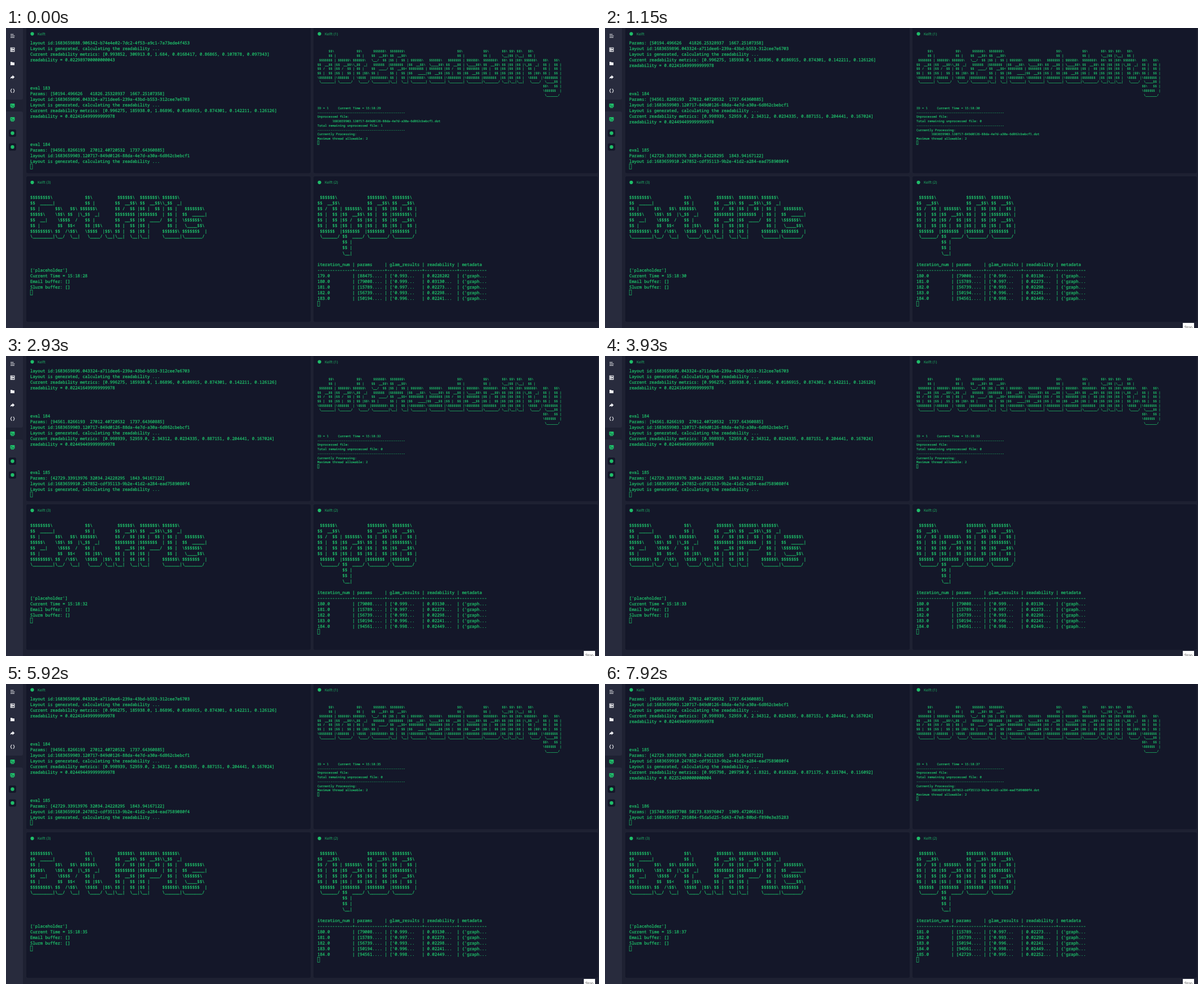
Animation, 1053 px wide and 532 px high, one loop 8 s. Source, as an HTML page:

```html
<!DOCTYPE html>
<html lang="en">
<head>
<meta charset="utf-8">
<title>Four terminals</title>
<style>
  html, body { margin: 0; height: 100%; overflow: hidden; background: #1e2132; }
  svg { display: block; width: 100vw; height: 100vh; }
  text { text-rendering: geometricPrecision; fill: #1fbd69; white-space: pre; }
  .term { font-family: "Noto Sans Mono", "DejaVu Sans Mono", monospace; }
  .term text { stroke: #1fbd69; stroke-width: .035em; }
  .title { font: 6.6px "Open Sans", "Noto Sans", sans-serif; }
  .cursor { fill: none; stroke: #1fbd69; stroke-width: .7; }
  .green { fill: #1fbd69; }
  .dark { fill: #141729; }
  .white { fill: #f4f5f8; }
  .line { fill: none; stroke: #f4f5f8; stroke-width: 1.1; }
</style>
</head>
<body>
<svg viewBox="0 0 1053 532">
  <defs>
    <g id="terminal">
      <rect x="-4" y="-4" width="8" height="6.4" rx="1" class="green"/>
      <path d="M-2.4-2.4-1.1-1.1-2.4.2M0 .5h2.2" fill="none" stroke="#141729" stroke-width=".7"/>
      <rect x="-2.5" y="2.9" width="5" height="1" class="green"/>
    </g>
    <g id="host">
      <rect x="-6.5" y="-6.5" width="13" height="13" rx="3" class="dark"/>
      <circle r="3.2" class="green"/>
    </g>
  </defs>
  <rect width="30" height="532" fill="#282b3d"/>
  <path d="M0 127h27q3 0 3-3v27q0-3-3-3H0z" fill="#1e2132"/>
  <path class="line" d="M8 11.3h5.5M8 14h7.5M8 16.7h7"/>
  <path class="line" d="M8.3 35h6.6v2.6H8.3zM8.3 39h6.6v2.6H8.3zM9.5 36.3h2M9.5 40.3h2"/>
  <path class="white" d="M8 60h2.8l1 1H15v5H8z"/>
  <path class="white" d="M11.5 83.5 15.3 87l-3.8 3.4v-2Q9 88.3 7.7 90q.4-4.1 3.8-4.5z"/>
  <path class="line" d="M10.6 108q-1.5 0-1.5 1.4 0 1.6-1.2 1.8 1.2.2 1.2 1.8 0 1.4 1.5 1.4M12.6 108q1.5 0 1.5 1.4 0 1.6 1.2 1.8-1.2.2-1.2 1.8 0 1.4-1.5 1.4"/>
  <use href="#terminal" x="11.5" y="138"/>
  <use href="#terminal" x="11.5" y="162"/>
  <use href="#host" x="11.5" y="186.5"/>
  <use href="#host" x="11.5" y="211"/>
  <g id="panels"></g>
  <g id="screens"></g>
  <g id="stop">
    <rect x="1026" y="523" width="20" height="10" fill="#fff"/>
    <text x="1029" y="533.4" class="title" style="fill:#333">Stop</text>
  </g>
</svg>
<script>
const LOOP = 8000;
const raw = String.raw;
const byId = id => document.getElementById(id);

// Banner letters, rows separated by "~".
const GLYPHS = {
  E: raw`$$$$$$$$\~$$  _____|~$$ |~$$$$$\~$$  __|~$$ |~$$$$$$$$\~\________|`,
  x: raw`~~$$\   $$\~\$$\ $$  |~ \$$$$  /~ $$  $$<~$$  /\$$\~\__/  \__|`,
  t: raw`  $$\~  $$ |~$$$$$$\~\_$$  _|~  $$ |~  $$ |$$\~  \$$$$  |~   \____/`,
  '.': raw`~~~~~~$$\~\__|`,
  A: raw` $$$$$$\~$$  __$$\~$$ /  $$ |~$$$$$$$$ |~$$  __$$ |~$$ |  $$ |~$$ |  $$ |~\__|  \__|`,
  P: raw`$$$$$$$\~$$  __$$\~$$ |  $$ |~$$$$$$$  |~$$  ____/~$$ |~$$ |~\__|`,
  I: raw`$$$$$$\~\_$$  _|~  $$ |~  $$ |~  $$ |~  $$ |~$$$$$$\~\______|`,
  s: raw`~~ $$$$$$$\~$$  _____|~\$$$$$$\~ \____$$\~$$$$$$$  |~\_______/`,
  O: raw` $$$$$$\~$$  __$$\~$$ /  $$ |~$$ |  $$ |~$$ |  $$ |~$$ |  $$ |~ $$$$$$  |~ \______/`,
  p: raw`~~ $$$$$$\~$$  __$$\~$$ /  $$ |~$$ |  $$ |~$$$$$$$  |~$$  ____/~$$ |~$$ |~\__|`,
  D: raw`$$$$$$$\~$$  __$$\~$$ |  $$ |~$$ |  $$ |~$$ |  $$ |~$$ |  $$ |~$$$$$$$  |~\_______/`,
  B: raw`$$$$$$$\~$$  __$$\~$$ |  $$ |~$$$$$$$\ |~$$  __$$\~$$ |  $$ |~$$$$$$$  |~\_______/`,
  d: raw`      $$\~      $$ |~ $$$$$$$ |~$$  __$$ |~$$ /  $$ |~$$ |  $$ |~\$$$$$$$ |~ \_______|`,
  o: raw`~~ $$$$$$\~$$  __$$\~$$ /  $$ |~$$ |  $$ |~\$$$$$$  |~ \______/`,
  2: raw` $$$$$$\~$$  __$$\~\__/  $$ |~ $$$$$$  |~$$  ____/~$$ |~$$$$$$$$\~\________|`,
  R: raw`$$$$$$$\~$$  __$$\~$$ |  $$ |~$$$$$$$  |~$$  __$$<~$$ |  $$ |~$$ |  $$ |~\__|  \__|`,
  e: raw`~~ $$$$$$\~$$  __$$\~$$$$$$$$ |~$$   ____|~\$$$$$$$\~ \_______|`,
  a: raw`~~ $$$$$$\~ \____$$\~ $$$$$$$ |~$$  __$$ |~\$$$$$$$ |~ \_______|`,
  b: raw`$$\~$$ |~$$$$$$$\~$$  __$$\~$$ |  $$ |~$$ |  $$ |~$$$$$$$  |~\_______/`,
  i: raw`$$\~\__|~$$\~$$ |~$$ |~$$ |~$$ |~\__|`,
  l: raw`$$\~$$ |~$$ |~$$ |~$$ |~$$ |~$$ |~\__|`,
  y: raw`~~$$\   $$\~$$ |  $$ |~$$ |  $$ |~$$ |  $$ |~\$$$$$$$ |~ \____$$ |~$$\   $$ |~\$$$$$$  |~ \______/`
};

// Joins letters, letting neighbours share a column when nothing collides.
function banner(word) {
  let rows = Array(11).fill('');
  for (const letter of word) {
    const lines = GLYPHS[letter].split('~');
    const width = Math.max(...lines.map(l => l.length));
    const glyph = rows.map((_, i) => (lines[i] || '').padEnd(width));
    const kern = rows[0] && rows.every((r, i) => r.endsWith(' ') || glyph[i][0] === ' ');
    rows = rows.map((r, i) => !kern ? r + glyph[i]
      : r.slice(0, -1) + (r.endsWith(' ') ? glyph[i][0] : r.at(-1)) + glyph[i].slice(1));
  }
  return rows;
}

const BANNERS = { reader: banner('dot2Readability'), apis: banner('Ext.APIs'), db: banner('OpDB') };

const RUNS = [
  [182, '', '1683659888.906342-b74e4e02-7dc2-4f53-a9c1-7a73ede4f453',
    '0.993852, 306913.0, 1.684, 0.0168417, 0.86865, 0.107878, 0.097343', '0.022989700000000043'],
  [183, '50194.496626   41826.25328937  1667.25107358', '1683659896.043324-a711dee6-239a-43bd-b553-312cee7e6703',
    '0.996275, 185938.0, 1.86896, 0.0186915, 0.874301, 0.142211, 0.126126', '0.022416499999999978'],
  [184, '94561.8266193  27012.40720532  1737.64360885', '1683659903.120717-849d0126-88da-4e7d-a30a-6d862cbebcf1',
    '0.998939, 52959.0, 2.34312, 0.0234335, 0.887151, 0.204441, 0.167024', '0.024494499999999978'],
  [185, '42729.33913976 32034.24228295  1843.94167122', '1683659910.247852-cdf35113-9b2e-41d2-a284-ead7589080f4',
    '0.995798, 209750.0, 1.8321, 0.0183228, 0.871175, 0.131704, 0.116092', '0.02252480000000004'],
  [186, '35740.51087708 50173.83976047  1909.47206613', '1683659917.291084-f5da5d25-5d43-47e8-80bd-f890e3e35283', '', '']
];
const LOG = RUNS.flatMap(([n, params, id, metrics, score]) => [
  `eval ${n}`, `Params: [${params}]`, `layout id:${id}`,
  'Layout is generated, calculating the readability ...',
  `Current readability metrics: [${metrics}]`, `readability = ${score}`, '', '', '', ''
]).slice(2);

const TABLE = [
  [179, 88475, '0.993', '0.0228202'], [180, 79008, '0.999', '0.03130...'],
  [181, 15789, '0.997', '0.02273...'], [182, 56739, '0.993', '0.02298...'],
  [183, 50194, '0.996', '0.02241...'], [184, 94561, '0.998', '0.02449...'],
  [185, 42729, '0.995', '0.02252...']
].map(([n, p, g, r]) => tableRow(`${n}.0`, `[${p}....`, `['${g}...`, r, "{'graph..."));

function tableRow(n, params, results, score, meta) {
  return [n.padEnd(13), params.padEnd(10), results.padEnd(12), score.padEnd(11), meta].join(' | ');
}

// Redraws: [cleared at, complete at, lines left in between].
const READER_REDRAWS = [[720, 760, 7], [1740, 1770, 7], [2680, 2720, 1], [3710, 3750, 7],
  [4720, 4760, 7], [5690, 5740, 2], [6690, 6720, 1], [7620, 7660, 1]];
const TABLE_REDRAWS = [[900, 940, 12], [1910, 1960, 14], [2890, 2930, 14], [3890, 3930, 14],
  [4900, 4940, 14], [5880, 5920, 12], [6890, 6930, 14], [7890, 7920, 12]];
const API_TICKS = [20, 870, 1880, 2860, 3860, 4870, 5880, 6870, 7890];

const passed = (times, t) => times.filter(time => t >= time).length;
const activeRedraw = (redraws, t) => redraws.find(([from, to]) => t >= from && t < to);

function logLines(t) {
  const top = [0, 9, 10, 19][passed([720, 2580, 7730], t)];
  return [...LOG.slice(top, top + 22), ''];
}

function readerLines(t) {
  const second = 29 + passed(READER_REDRAWS.map(r => r[1]), t);
  const file = ' '.repeat(8) + RUNS[second < 36 ? 2 : 3][2] + '.dot';
  const waiting = second === 29 || second === 36;
  const working = second === 30 || second === 37;
  const rule = '-'.repeat(47);
  const lines = ['', '', ...BANNERS.reader, '', '',
    `ID = 1     Current Time = 15:18:${second}`, rule,
    'Unprocessed file:', ...(waiting ? [file] : []),
    `Total remaining unprocessed file: ${+waiting}`, rule,
    'Currently Processing:', ...(working ? [file] : []),
    'Maximum thread allowable: 2', ''];
  const redraw = activeRedraw(READER_REDRAWS, t);
  return redraw ? lines.slice(0, redraw[2]) : lines;
}

function apiLines(t) {
  const lines = [...BANNERS.apis, '', '', "['placeholder']",
    `Current Time = 15:18:${28 + passed(API_TICKS, t)}`, 'Email buffer: []', 'Slurm buffer: []', ''];
  return t >= 5880 && t < 5920 ? [...lines.slice(0, 13), ''] : lines;
}

function tableLines(t) {
  const first = passed([940, 7920], t);
  const lines = [...BANNERS.db, '',
    tableRow('iteration_num', 'params', 'glam_results', 'readability', 'metadata'),
    [14, 12, 14, 13, 11].map(n => '-'.repeat(n)).join('+'),
    ...TABLE.slice(first, first + 5), ''];
  const redraw = activeRedraw(TABLE_REDRAWS, t);
  return redraw ? [...lines.slice(0, redraw[2]), ''] : lines;
}

const escapeText = s => s.replace(/&/g, '&amp;').replace(/</g, '&lt;');

// The cursor sits after the last line.
function terminal(x, baseline, size, pitch, lines) {
  const y = i => (baseline + i * pitch).toFixed(2);
  const last = lines.length - 1, cell = size * .6;
  return `<g class="term" font-size="${size}">` +
    lines.map((s, i) => s.trim() && `<text xml:space="preserve" x="${x}" y="${y(i)}">${escapeText(s)}</text>`).join('') +
    `<rect class="cursor" x="${x + lines[last].length * cell + .2}" y="${y(last) - pitch * .77}" width="${cell - .6}" height="${pitch - .8}"/></g>`;
}

byId('panels').innerHTML = [
  [36, -6, 'Kelft'], [546, -6, 'Kelft (1)'], [36, 263, 'Kelft (3)'], [546, 263, 'Kelft (2)']
].map(([x, y, title]) => {
  const middle = y < 0 ? 10.3 : 273.8;
  return `<rect x="${x}" y="${y}" width="505" height="${y < 0 ? 263.5 : 258}" rx="3" class="dark"/>
    <circle cx="${x + 10.6}" cy="${middle}" r="3.1" class="green"/>
    <text x="${x + 20}" y="${middle + 2.6}" class="title">${title}</text>`;
}).join('');

let shown = '';
function frame() {
  const t = performance.now() % LOOP;
  const markup = terminal(43, 29.3, 7.38, 9.97, logLines(t)) +
    terminal(553, 27.8, 5.53, 7.74, readerLines(t)) +
    terminal(43, 302.7, 7.38, 9.97, apiLines(t)) +
    terminal(553, 302.7, 7.38, 9.97, tableLines(t));
  if (markup !== shown) byId('screens').innerHTML = shown = markup;
  byId('stop').style.display = t >= 1110 ? '' : 'none';
  requestAnimationFrame(frame);
}
frame();
</script>
</body>
</html>
```
